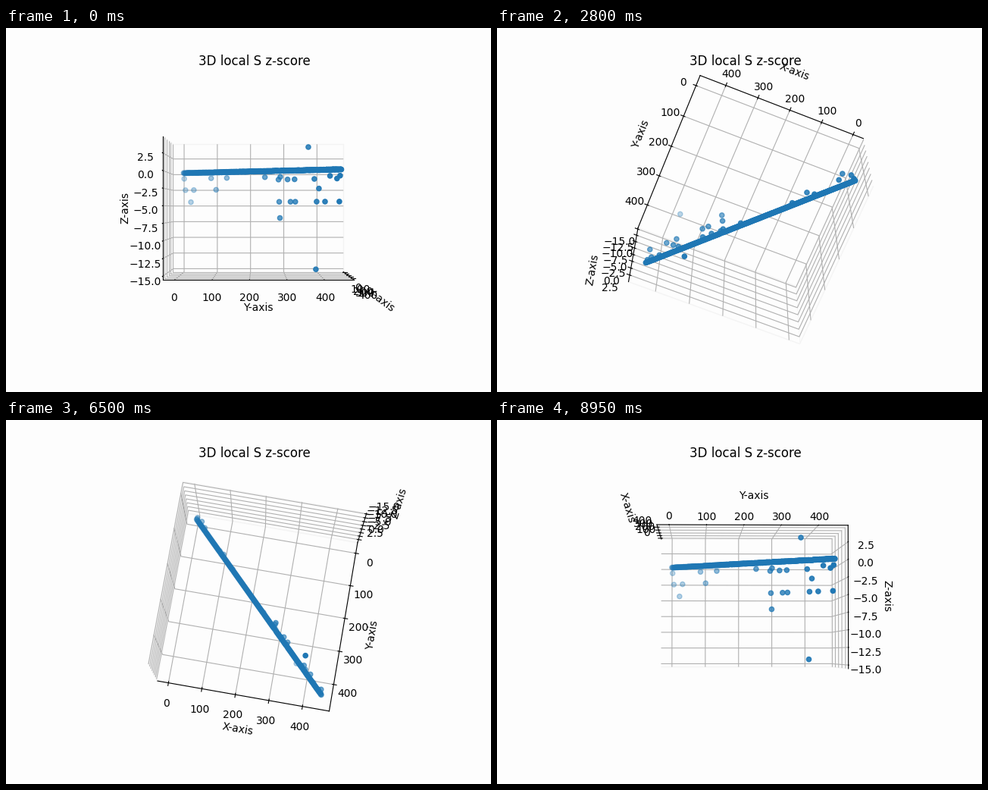
A matplotlib script that plays this animation: 640x480 px, repeating every 9000 ms.

```python
import numpy as np
import matplotlib.pyplot as plt
from matplotlib.animation import FuncAnimation

FRAMES = 180
STEP = 360 / FRAMES
PAPER = "#fdfdfd"
PANE_EDGE = "#f4f4f4"

# score level: places along the diagonal that drop to it
DIPS = {
    -0.7: (2, 85, 132, 242, 285, 418, 444),
    -1.1: (280, 305, 324, 377, 436),
    -2.5: (6, 32, 100, 389),
    -4.4: (23, 282, 313, 326, 383, 405, 442),
    -6.8: (284,),
    -14.21: (381,),
    3.56: (361,),
}


def make_scores(count=448):
    """A flat, slightly noisy score with a few dips and one peak."""
    rng = np.random.default_rng(4)
    score = 0.2 + 0.04 * rng.uniform(-1, 1, count)
    for level, places in DIPS.items():
        score[list(places)] = level
    return np.arange(count), score


def padded(values):
    """Data range with the 5 % margin plus 1/48 of the view on each side."""
    lo, hi = values.min(), values.max()
    pad = (hi - lo) * (0.05 + 1.1 / 48)
    return lo - pad, hi + pad


def signed(angle):
    return (angle + 180) % 360 - 180


pos, score = make_scores()

fig = plt.figure(figsize=(6.4, 4.8), dpi=100, facecolor=PAPER)
ax = fig.add_subplot(projection="3d", facecolor=PAPER)
ax.scatter(pos, pos, score)
ax.set(xlim=padded(pos), ylim=padded(pos), zlim=padded(score),
       xlabel="X-axis", ylabel="Y-axis", zlabel="Z-axis",
       title="3D local S z-score")
for axis in (ax.xaxis, ax.yaxis, ax.zaxis):
    axis.pane.set(alpha=1, facecolor=PAPER, edgecolor=PANE_EDGE)


def draw(i):
    angle = signed(i * STEP)
    ax.view_init(elev=angle, azim=angle)
    return ()


anim = FuncAnimation(fig, draw, frames=FRAMES, interval=50,
                     init_func=lambda: draw(0), repeat=True, blit=False)
plt.show()
```
